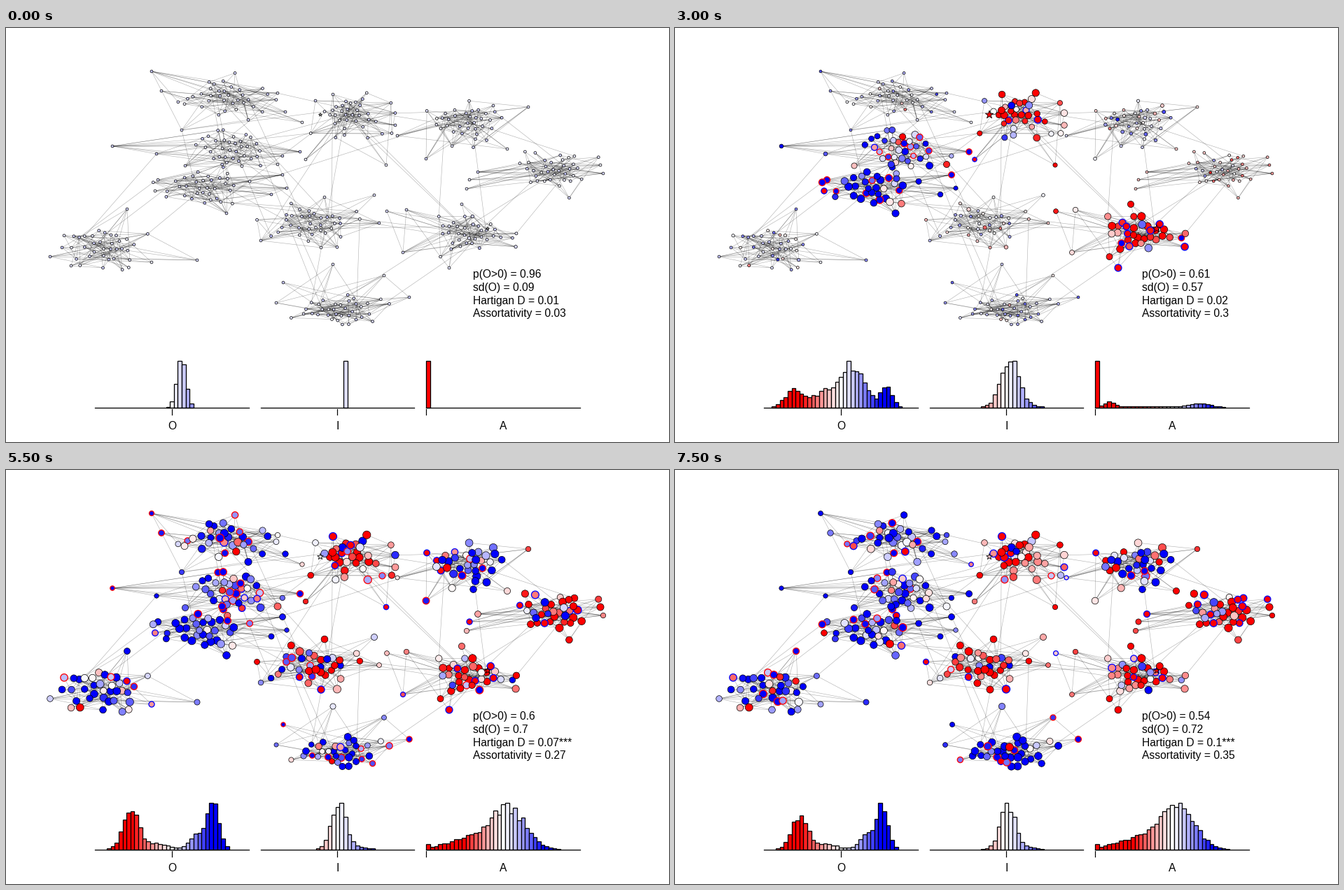
These frames come from a looping animation (947 by 592 pixels, 8 s). A matplotlib script:

```python
import numpy as np
import matplotlib.pyplot as plt
from matplotlib.animation import FuncAnimation
from matplotlib.collections import LineCollection
from matplotlib.patches import Rectangle

W, H, DPI = 947, 592, 72  # at 72 dpi one point is one pixel
FRAMES, INTERVAL = 16, 500
KEYS = [0, 4, 6, 8, 11, 13, 15]
GROUP_SIZE = 40
SPREAD = np.array([24, 11.5])
rng = np.random.default_rng(12)

plt.rcParams["font.family"] = "Liberation Sans"
fig = plt.figure(figsize=(W / DPI, H / DPI), dpi=DPI, facecolor="white")
ax = fig.add_axes([0, 0, 1, 1])
ax.set_xlim(0, W)
ax.set_ylim(H, 0)
ax.axis("off")


def ease(t, start, span):
    u = np.clip((t - np.asarray(start)) / span, 0, 1)
    return u * u * (3 - 2 * u)


def tint(v):
    """Red for -1, white for 0, blue for +1."""
    v = np.clip(np.asarray(v, float), -1, 1)
    fade = 1 - np.abs(v)
    return np.stack([np.where(v > 0, fade, 1), fade,
                     np.where(v < 0, fade, 1)], axis=-1)


# ---- network ----
points, onsets, leans = [], [], []


def add_group(center, onset, lean, *tips):
    """A few outlying tips, then a seeded cloud with some strays."""
    nodes = [np.array(p, float) for p in tips]
    gap = 7.5
    while len(nodes) < GROUP_SIZE:
        z = rng.normal(size=2)
        stretch = 1.9 if rng.random() < .25 else 1.05
        p = center + z * SPREAD * stretch
        if np.hypot(*z) < 1.8 and all(np.hypot(*(p - q)) > gap for q in nodes):
            nodes.append(p)
        gap *= .9995
    points.append(np.array(nodes))
    onsets.append(onset)
    leans.append(lean)


# center, onset of activity, opinion at start and end, outlying nodes
add_group((313, 96), 6, (.5, .5),
          (208, 62), (222, 90), (251, 146), (399, 120), (423, 135))
add_group((495, 124), 2.2, (-.55, -.35),
          (467, 95), (442, 104), (556, 139), (428, 188), (543, 196))
add_group((656, 137), 5.2, (.3, .35),
          (746, 113), (696, 111), (559, 154), (600, 187), (716, 173))
add_group((790, 207), 6, (-.1, -.65),
          (853, 208), (849, 196), (674, 206), (662, 217), (658, 230))
add_group((322, 172), 2, (.15, .35),
          (152, 169), (215, 180), (256, 197), (388, 195), (420, 177))
add_group((285, 226), 1.5, (.9, .45),
          (213, 233), (315, 265), (379, 238), (401, 229), (395, 210))
add_group((140, 310), 5.5, (.3, .5),
          (63, 327), (93, 340), (208, 335), (273, 332), (173, 259))
add_group((435, 279), 5, (.4, -.65),
          (455, 242), (364, 304), (450, 314), (533, 279), (526, 239))
add_group((663, 294), -.5, (-.6, -.4),
          (544, 262), (572, 260), (567, 321), (651, 252), (633, 343))
add_group((476, 403), 7, (.3, .8),
          (467, 338), (396, 364), (386, 393), (540, 354), (576, 385))

xy = np.concatenate(points)
N = len(xy)
group = np.repeat(np.arange(len(points)), GROUP_SIZE)
middle = np.array([np.median(p, axis=0) for p in points])


def make_edges():
    """Random ties inside groups, between near groups and a few long ones."""
    pairs = []
    for i, g in enumerate(group):
        mates = g * GROUP_SIZE + rng.choice(GROUP_SIZE, 3, replace=False)
        pairs += [(i, j) for j in mates if i != j]
    for a in range(len(points)):
        for b in range(a):
            if np.hypot(*(middle[a] - middle[b])) < 250:
                ends = rng.integers(GROUP_SIZE, size=(2, 2))
                pairs += list(ends + GROUP_SIZE * np.array([a, b]))
    pairs += list(rng.integers(N, size=(8, 2)))
    return [xy[list(pair)] for pair in pairs]


ax.add_collection(LineCollection(make_edges(), colors=[(0, 0, 0, .3)],
                                 linewidths=.6, zorder=1))

onset = np.array(onsets)[group]
first, last = np.array(leans)[group].T
reach = np.hypot(*(xy - middle[group]).T)
remote = np.clip((reach - 40) / 80, 0, 1)  # far nodes stay less active
bias = rng.normal(size=N)
phase = rng.uniform(0, 2 * np.pi, N)
speed = rng.uniform(.2, .7, N)
response = rng.uniform(.6, 1.8, N)

dots = ax.scatter(xy[:, 0], xy[:, 1], s=16, zorder=3)
stars = ax.scatter([449, 688], [124, 287], marker="*", zorder=4,
                   edgecolors="black", linewidths=.8)
STAR_VIEW = [0, -1, -1, 1, 0, .4, -.2]


def draw_network(t):
    level = .75 * ease(t, onset, 5.5) * (1 - .5 * remote)
    act = level ** response
    wake = ease(t, 0, 4)
    lean = .35 + wake * (first + (last - first) * t / FRAMES - .35)
    spread = .2 + .8 * wake
    view = lean + spread * (.5 * bias + .35 * np.sin(phase + speed * t))
    value = np.clip(view * (.4 + 2 * act), -1, 1)
    dots.set_facecolors(tint(value))
    dots.set_sizes((3.8 + 9 * act) ** 2)

    # recently contradicted nodes wear the opposite colour as a ring
    chance = np.random.default_rng(100 + t).random(N)
    ringed = (chance < .2) & (act > .2) & (np.abs(value) > .2)
    edge = np.zeros((N, 3))
    edge[ringed] = tint(-np.sign(value[ringed]))
    dots.set_edgecolors(edge)
    dots.set_linewidths(np.where(ringed, 1.3, .7))

    stars.set_facecolors(tint([np.interp(t, KEYS, STAR_VIEW), -wake]))
    stars.set_sizes([(5 + 7 * wake - 3 * ease(t, 7, 4)) ** 2])


# ---- histograms ----
BINS, BIN_W, BASE, TOP = 39, 5.63, 542.5, 66.5
bins = np.arange(BINS)
offset = (bins - 19) / 10
bar_colors = tint(np.sign(offset) * np.abs(offset) ** 1.3)


def bump(center, width):
    return np.exp(-.5 * ((bins - center) / width) ** 2)


def opinion(t):
    """One narrow peak widens, then splits into a red and a blue one."""
    wake, split = ease(t, 0, 4), ease(t, 3, 7)
    mixed = 4 * split * (1 - split)
    return ((1 - split) * bump(21.4 + wake / 2, 1.15 + 1.2 * wake)
            + split * (.75 * bump(5.5 + 3.1 * split, 1.9)
                       + bump(31.2 - 1.8 * split, 1.5)
                       + .33 * bump(25.3, 1.8) + .12 * bump(15, 3))
            + mixed * .4 * bump(18, 5) + .05 * wake * bump(8, 3))


def information(t):
    wake, settle = ease(t, 0, 4), ease(t, 4, 4)
    return (bump(21 - .8 * wake - .9 * settle, .3 + 2.3 * wake - .8 * settle)
            + .08 * wake * bump(21, 4))


def attention(t):
    """The spike at zero drains into a broad hump."""
    wake, rise = ease(t, 0, 4), ease(t, 5.5, 5.5)
    return (bump(0, .3) * (1 - .9 * ease(t, 7, 4))
            + rise * bump(26 - 6 * rise, 2.5 + 1.7 * rise)
            + rise * .25 * bump(10, 5)
            + wake * (.02 * bump(18, 9) + .05 * bump(26, 2.5)
                      + .12 * (1 - .8 * rise) * bump(3, 1.2)))


def add_histogram(x0, name, tick, shape):
    x1 = x0 + BINS * BIN_W
    bars = [ax.add_patch(Rectangle((x0 + k * BIN_W, BASE), BIN_W, 0,
                                   facecolor=color, edgecolor="black",
                                   linewidth=1.3, zorder=3))
            for k, color in zip(bins, bar_colors)]
    ax.plot([x0, x1], [BASE, BASE], color="black", lw=1.3, zorder=4)
    ax.plot([tick, tick], [545, 553], color="black", lw=1.2)
    ax.text((x0 + x1) / 2, 574, name, size=15.6, ha="center", va="baseline")
    return bars, shape


histograms = [add_histogram(127.2, "O", 237, opinion),
              add_histogram(363.8, "I", 473.5, information),
              add_histogram(600.5, "A", 600.5, attention)]


def draw_histograms(t):
    noise = np.random.default_rng(40 + t)
    for bars, shape in histograms:
        h = shape(t) * noise.uniform(1 - .25 * ease(t, 0, 2), 1, BINS)
        h *= TOP / h.max()
        for bar, height in zip(bars, h):
            bar.set_height(-height)
            bar.set_visible(height > .7)


# ---- statistics ----
STATS = [("p(O>0)", [.96, .73, .61, .53, .6, .57, .54]),
         ("sd(O)", [.09, .37, .57, .67, .7, .71, .72]),
         ("Hartigan D", [.01, .01, .02, .04, .07, .09, .1]),
         ("Assortativity", [.03, .19, .3, .26, .27, .3, .35])]
labels = [ax.text(666.8, 357.3 + 18.7 * i, "", size=15.6, va="baseline",
                  zorder=5) for i in range(len(STATS))]


def draw_stats(t):
    for label, (name, values) in zip(labels, STATS):
        value = round(float(np.interp(t, KEYS, values)), 2)
        mark = "***" if name == "Hartigan D" and value >= .03 else ""
        label.set_text(f"{name} = {value:g}{mark}")


def update(t):
    draw_network(t)
    draw_histograms(t)
    draw_stats(t)
    return []


anim = FuncAnimation(fig, update, frames=FRAMES, interval=INTERVAL,
                     repeat=True, repeat_delay=0, blit=False)
plt.show()
```
